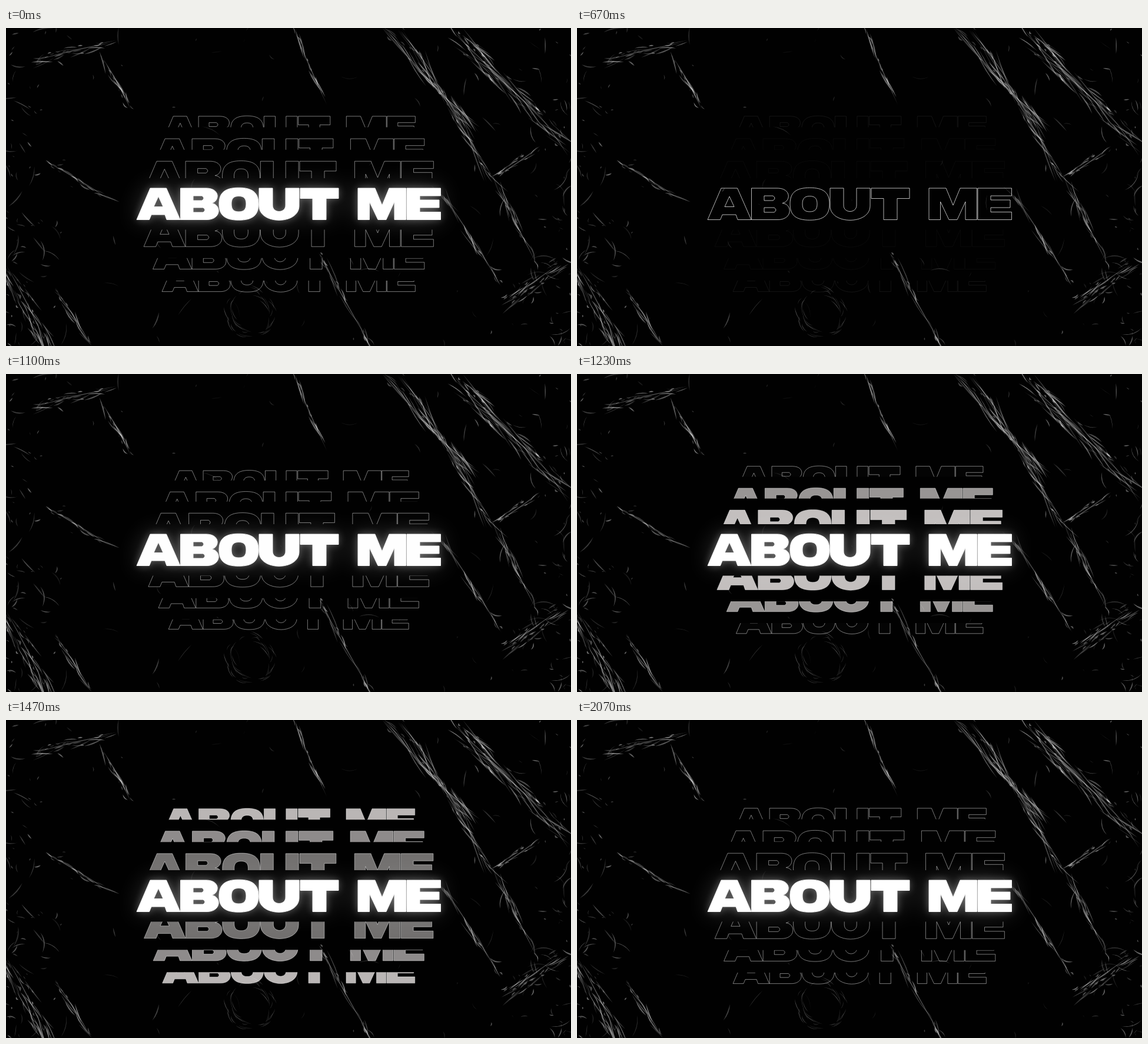
An HTML page with a canvas that plays this animation: 960x540 px, repeating every 2170 ms.

```html
<!DOCTYPE html>
<html lang="en">
<head>
<meta charset="utf-8">
<title>ABOUT ME</title>
<style>
html, body { margin: 0; width: 100%; height: 100%; overflow: hidden; background: #000; }
canvas { display: block; width: 960px; height: 540px; }
</style>
</head>
<body>
<canvas id="stage" width="960" height="540" role="img" aria-label="ABOUT ME">ABOUT ME</canvas>
<script>
const W = 960, H = 540, LOOP = 2170;
const CX = 480, CY = 298.75, HALF = 26.75;
const ctx = document.getElementById('stage').getContext('2d');

const clamp = v => Math.max(0, Math.min(1, v));
const mix = (a, b, p) => a + (b - a) * p;
const easeOut = p => 1 - (1 - p) ** 3;
const white = a => `rgba(255,255,255,${a})`;

// Extended black capitals, one line per letter
const lettering = new Path2D([
  'M222 325.5L245 272H272.5L296 325.5H273L270 317H247L243.5 325.5ZM251 303.5H267L259 286Z',
  'M296.5 272H340C365 272 363 295 349 297.5C366 299 367 325.5 341 325.5H296.5ZM318 285V293H333Q339 289 333 285ZM318 305V313H335Q341 309 335 305Z',
  roundLetter(395.5, 33.5, 27.5) + roundLetter(395.5, 12.5, 13.2),
  'M430 272H453V301C453 315 475 315 475 301V272H498V302C498 334.5 430 334.5 430 302Z',
  'M500 272H565V289.5H544V325.5H521V289.5H500Z',
  'M598 272H627L639 301L651 272H679.5V325.5H660V295L646 325.5H632L617.5 295V325.5H598Z',
  'M681 272H738.5V285H703V292H736V305H703V312.5H738.5V325.5H681Z'
].join(''));

function roundLetter(x, rx, ry) {
  const k = .7, y = CY;
  return `M${x} ${y - ry}C${x + rx * k} ${y - ry} ${x + rx} ${y - ry * k} ${x + rx} ${y}` +
    `S${x + rx * k} ${y + ry} ${x} ${y + ry}S${x - rx} ${y + ry * k} ${x - rx} ${y}` +
    `S${x - rx * k} ${y - ry} ${x} ${y - ry}Z`;
}

function randomizer(seed) {
  return () => {
    seed = (seed * 1664525 + 1013904223) >>> 0;
    return seed / 4294967296;
  };
}

// Main folds of the film: x1, y1, x2, y2, breadth
const folds = [
  [752, 0, 945, 190, 13], [640, 0, 785, 160, 7], [672, 0, 834, 264, 6], [834, 264, 902, 402, 5],
  [0, 402, 70, 540, 15], [85, 445, 145, 540, 4], [530, 380, 620, 540, 4], [55, 54, 180, 25, 8],
  [165, 52, 212, 138, 5], [488, 0, 545, 130, 2], [65, 225, 175, 291, 3], [850, 465, 938, 402, 13],
  [740, 280, 842, 440, 4], [836, 250, 908, 200, 7]
];

// A lens-shaped highlight along a bent line
function glint(g, x, y, angle, len, bend, width, alpha) {
  g.save();
  g.translate(x, y);
  g.rotate(angle);
  g.fillStyle = white(alpha);
  g.beginPath();
  g.moveTo(-len / 2, 0);
  g.quadraticCurveTo(0, bend + width, len / 2, 0);
  g.quadraticCurveTo(0, bend - width, -len / 2, 0);
  g.fill();
  g.restore();
}

function makeFilm() {
  const film = document.createElement('canvas');
  film.width = W;
  film.height = H;
  const g = film.getContext('2d'), rnd = randomizer(41);
  const spread = n => (rnd() * 2 - 1) * n;
  g.fillStyle = '#010101';
  g.fillRect(0, 0, W, H);

  for (const [x1, y1, x2, y2, breadth] of folds) {
    const len = Math.hypot(x2 - x1, y2 - y1), angle = Math.atan2(y2 - y1, x2 - x1);
    glint(g, (x1 + x2) / 2, (y1 + y2) / 2, angle, len, spread(5), 1.6, .3);
    for (let i = 6 + len * breadth / 45; i > 0; i--) {
      const p = rnd(), side = spread(breadth);
      glint(g, mix(x1, x2, p) - Math.sin(angle) * side, mix(y1, y2, p) + Math.cos(angle) * side,
        angle + spread(.25), 6 + rnd() ** 2 * len * .35, spread(4), .7 + rnd() * 1.8, .12 + rnd() * .35);
    }
  }

  // Small wrinkles gather towards the left, right and bottom edges
  for (let i = 0; i < 2200; i++) {
    const x = rnd() * W, y = rnd() * H;
    const edge = Math.abs(x / W - .5) * 2;
    const density = .025 + .75 * edge ** 12 + .12 * edge ** 2 * (y / H) ** 3;
    if (rnd() > density) continue;
    const size = 4 + rnd() ** 2 * 34;
    glint(g, x, y, 1 + spread(1.3), size, spread(size * .3),
      .6 + rnd() * 1.6, (.08 + rnd() * .36) * mix(.45, 1, edge));
  }

  // Crumpled ring below the lettering
  for (let i = 0; i < 36; i++) {
    const a = rnd() * Math.PI * 2, r = 26 + rnd() * 16;
    glint(g, 415 + Math.cos(a) * r, 484 + Math.sin(a) * r, a + Math.PI / 2 + spread(.4),
      10 + rnd() * 18, -4, 1, .1 + rnd() * .2);
  }
  return film;
}

// i counts the rows outwards; inner is the edge they slide out from
function drawRow(i, t, p, inner, line) {
  const off = mix(30 * i, 47 + 39.8 * i, p);
  const s = mix(.8 - .093 * i, .953 - .06 * i, p);
  const flash = clamp((t - 1130 - 50 * i) / 80);
  const fill = flash * clamp((1800 + 136 * i - t) / 743) ** (1 + .25 * i);
  for (const side of [-1, 1]) {
    ctx.save();
    ctx.beginPath();
    ctx.rect(0, side < 0 ? 0 : CY + inner, W, side < 0 ? CY - inner : H);
    ctx.clip();
    ctx.translate(CX, CY + side * off);
    ctx.scale(s, s);
    ctx.translate(-CX, -CY);
    ctx.fillStyle = `rgba(255,250,249,${fill})`;
    ctx.fill(lettering, 'evenodd');
    ctx.strokeStyle = white(line * .52);
    ctx.lineWidth = .9 / s;
    ctx.stroke(lettering);
    ctx.restore();
  }
  return off + HALF * s;
}

function drawMain(level) {
  if (level > 0) {
    ctx.save();
    ctx.fillStyle = '#000';
    for (const [blur, alpha] of [[44, .26], [14, .34]]) {
      ctx.shadowBlur = blur;
      ctx.shadowColor = white(alpha * level);
      ctx.fill(lettering, 'evenodd');
    }
    ctx.restore();
    ctx.fillStyle = white(level);
    ctx.fill(lettering, 'evenodd');
  }
  ctx.strokeStyle = white(.7 + .2 * level);
  ctx.lineWidth = 1;
  ctx.stroke(lettering);
}

const film = makeFilm();

function draw(t) {
  ctx.drawImage(film, 0, 0);
  const leaving = t < 730;
  const p = leaving ? 1 : easeOut(clamp((t - 670) / 1030));
  let inner = HALF + 17;
  for (let i = 0; i < 3; i++) {
    const line = leaving
      ? Math.max(.08, 1 - clamp((t - 130) / (450 + 100 * i)))
      : clamp((t - 700) / 250);
    inner = drawRow(i, t, p, inner, line) + 19.5;
  }
  drawMain(leaving ? 1 - clamp((t - 130) / 470) ** 3 : easeOut(clamp((t - 700) / 470)));
}

const start = performance.now();
function tick() {
  draw((performance.now() - start) % LOOP);
  requestAnimationFrame(tick);
}
tick();
</script>
</body>
</html>
```
